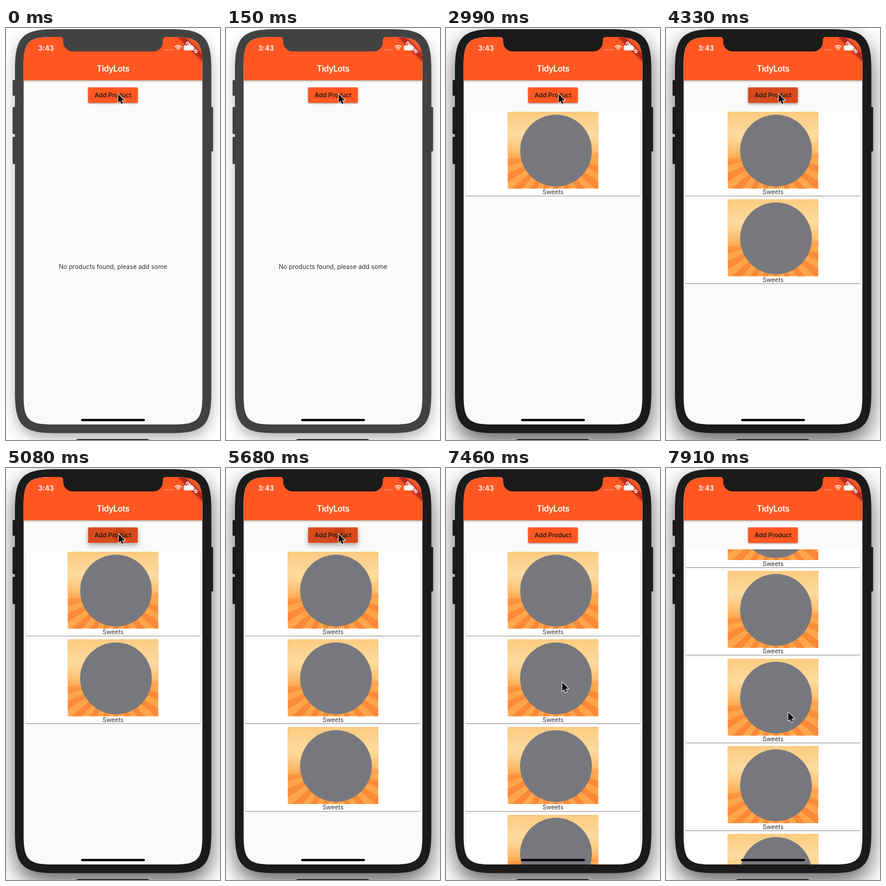
Animation of 358 by 689 pixels, one loop 8000 ms. Source, as an HTML page:

```html
<!DOCTYPE html>
<html lang="en">
<head>
<meta charset="utf-8">
<title>Product list</title>
<style>
html, body { margin: 0; width: 100%; height: 100%; overflow: hidden; background: #fff; }
svg { display: block; width: 358px; height: 689px; font-family: Inter, "Open Sans", sans-serif; }
text { text-anchor: middle; }

.frame, .body, .btn, .ripple, .empty, .card, .list, .cursor {
  animation: 8s -5ms step-end infinite;
}
.frame { animation-name: frame; }
.body { animation-name: shade; }
.btn { animation-name: press; }
.ripple { animation-name: ripple; }
.empty { animation-name: leave; }
.list { animation-name: scroll; }
.cursor { animation-name: cursor; }
.c1 { animation-name: add1; }
.c2 { animation-name: add2; }
.c3 { animation-name: add3; }
.c4 { animation-name: add4; }
.c5 { animation-name: add5; }

/* the window gains focus */
@keyframes frame {
  0% { fill: #424242; }
  28%, 100% { fill: #1b1b1b; }
}
@keyframes shade {
  0% { filter: drop-shadow(0 9px 11px rgba(0,0,0,.3)); }
  28%, 100% { filter: drop-shadow(0 15px 18px rgba(0,0,0,.62)); }
}

/* five clicks: touch, hold, release, rest */
@keyframes press {
  0%, 37.375%, 56%, 67.25%, 74.75%, 83.875%, 100% {
    fill: #ff5722; filter: drop-shadow(0 1px 1px rgba(0,0,0,.4));
  }
  29.875%, 48.625%, 59.75%, 69.125%, 78.375% {
    fill: #ef5120; filter: drop-shadow(0 2px 1.5px rgba(0,0,0,.35));
  }
  31.75%, 50.5%, 61.625%, 71%, 80.25% {
    fill: #d84a1d; filter: drop-shadow(0 4px 4px rgba(0,0,0,.32));
  }
  35.5%, 54.125%, 65.375%, 72.875%, 82% {
    fill: #d84a1d; filter: drop-shadow(0 2px 2px rgba(0,0,0,.36));
  }
}
@keyframes ripple {
  0%, 35.5%, 54.125%, 65.375%, 72.875%, 82%, 100% { r: 0px; }
  29.875%, 48.625%, 59.75%, 69.125%, 78.375% { r: 5px; }
  31.75%, 50.5%, 61.625%, 71%, 80.25% { r: 11px; }
}

@keyframes leave { 0% { opacity: 1; } 35.5%, 100% { opacity: 0; } }
@keyframes add1 { 0% { opacity: 0; } 35.5%, 100% { opacity: 1; } }
@keyframes add2 { 0% { opacity: 0; } 54.125%, 100% { opacity: 1; } }
@keyframes add3 { 0% { opacity: 0; } 65.375%, 100% { opacity: 1; } }
@keyframes add4 { 0% { opacity: 0; } 72.875%, 100% { opacity: 1; } }
@keyframes add5 { 0% { opacity: 0; } 82%, 100% { opacity: 1; } }

@keyframes scroll {
  0%, 93.25% { transform: none; }
  95.125% { transform: translateY(-54px); }
  97% { transform: translateY(-98px); }
  98.875%, 100% { transform: translateY(-114.5px); }
}
@keyframes cursor {
  0% { transform: translate(187.5px, 110px); }
  1.875% { transform: translate(188.5px, 110px); }
  83.875% { transform: translate(192px, 190px); }
  85.75% { transform: translate(200px, 320px); }
  87.625% { transform: translate(204px, 405px); }
  93.25% { transform: translate(194.5px, 358px); }
  95.125% { transform: translate(196px, 304px); }
  97% { transform: translate(200px, 345px); }
  98.875%, 100% { transform: translate(204.5px, 408px); }
}
</style>
</head>
<body>
<svg viewBox="0 0 358 689">
  <defs>
    <clipPath id="screen">
      <path d="M29.5 63c0-40 8-48 48-48h203c40 0 48 8 48 48v552c0 40-8 48-48 48h-203c-40 0-48-8-48-48z"/>
    </clipPath>
    <clipPath id="port"><rect x="29" y="136.3" width="300" height="527"/></clipPath>
    <clipPath id="pic"><rect x="103.5" y="140" width="151" height="128.5"/></clipPath>
    <linearGradient id="sky" x2="0" y2="1">
      <stop offset="0" stop-color="#fbcb80"/>
      <stop offset=".3" stop-color="#fddb9f"/>
      <stop offset=".5" stop-color="#fdc277"/>
      <stop offset=".66" stop-color="#fda648" stop-opacity=".25"/>
      <stop offset="1" stop-color="#fb8a2c" stop-opacity="0"/>
    </linearGradient>
    <g id="card">
      <rect x="32.4" y="139.4" width="293.2" height="141" rx="2.9" fill="#fff"
        style="filter:drop-shadow(0 1px .5px rgba(0,0,0,.42))"/>
      <g clip-path="url(#pic)">
        <rect x="103" y="139" width="152" height="130" fill="#ffa64c"/>
        <circle cx="180" cy="208" r="55" fill="none" stroke="#fa8837" stroke-width="110"
          pathLength="44" stroke-dasharray="1"/>
        <rect x="103" y="139" width="152" height="130" fill="url(#sky)"/>
        <circle cx="184" cy="205" r="60" fill="#77787d"/>
      </g>
      <text x="179" y="278" font-size="10.2" fill="#333">Sweets</text>
    </g>
  </defs>

  <g class="body">
    <path class="frame" d="M15 70c0-55.5 12.5-68 68-68h192.5c55.5 0 68 12.5 68 68v539.5c0 55.5-12.5 68-68 68h-192.5c-55.5 0-68-12.5-68-68z"/>
  </g>
  <g class="frame">
    <rect x="11" y="87" width="6" height="26.5" rx="1.5"/>
    <rect x="11" y="132" width="6" height="45.5" rx="1.5"/>
    <rect x="11" y="182" width="6" height="45.5" rx="1.5"/>
    <rect x="340" y="132" width="6.5" height="74.5" rx="1.5"/>
  </g>
  <path d="M117 689q1-1.5 4-1.5h115q3 0 4 1.5z" fill="#111"/>

  <g clip-path="url(#screen)">
    <rect x="29" y="15" width="300" height="649" fill="#fafafa"/>
    <text class="empty" x="179" y="403.3" font-size="10.4" fill="#333">No products found, please add some</text>

    <g clip-path="url(#port)">
      <g class="list">
        <use class="card c1" href="#card"/>
        <use class="card c2" href="#card" y="146.7"/>
        <use class="card c3" href="#card" y="293.4"/>
        <use class="card c4" href="#card" y="440.1"/>
        <use class="card c5" href="#card" y="586.8"/>
      </g>
    </g>

    <rect class="btn" x="137.3" y="99.3" width="83.2" height="26" rx="1.5"/>
    <circle class="ripple" cx="190" cy="112" r="0" fill="#a02c08" opacity=".35"/>
    <text x="179" y="115.8" font-size="10.3" font-weight="500" fill="#111">Add Product</text>

    <rect x="20" y="5" width="318" height="82.4" fill="#ff5722"
      style="filter:drop-shadow(0 1.5px 1.8px rgba(0,0,0,.4))"/>
    <text x="179" y="73" font-size="13.8" font-weight="600" letter-spacing="-.45" fill="#fff">TidyLots</text>

    <g transform="translate(328.5 15) rotate(45)">
      <rect x="-29" y="20.2" width="58" height="8.7" fill="#b71c1c" fill-opacity=".66"
        style="filter:drop-shadow(0 0 2px rgba(0,0,0,.45))"/>
      <text y="27.2" font-size="7.3" font-weight="900" fill="#fff">DEBUG</text>
    </g>

    <text x="67" y="37.8" font-size="11.8" font-weight="600" fill="#fff">3:43</text>
    <path d="M266.3 36.5h13" stroke="#fff" stroke-opacity=".4" stroke-width="2.4"
      stroke-linecap="round" stroke-dasharray="0 3.7"/>
    <g fill="none" stroke="#fff" stroke-width="1.7">
      <path d="M282.5 31.7q5.5-4.6 11 0M284.7 34.2q3.3-2.8 6.6 0"/>
      <path d="M288 37.6l-1.4-1.7q1.4-1.1 2.8 0z" fill="#fff" stroke-width=".3"/>
    </g>
    <rect x="297.5" y="29" width="16" height="8.5" rx="2.4" fill="#fff"/>
    <path d="M314.5 31.7q1.5 1.5 0 3z" fill="#fff"/>

    <rect x="125.5" y="653.7" width="107" height="3.8" rx="1.9"/>
  </g>
  <path class="frame" d="M90.9 14v1a4.8 4.8 0 0 1 4.8 4.8v3.4a16 16 0 0 0 16 16h134.6a16 16 0 0 0 16-16v-3.4a4.8 4.8 0 0 1 4.8-4.8v-1z"/>

  <path class="cursor" d="M0 .5v14.6l3.4-3.2 2.3 5.2 2.3-1-2.3-5.1h4.8z"
    stroke="#fff" stroke-width="1.8" stroke-linejoin="round"
    style="paint-order:stroke"/>
</svg>
</body>
</html>
```
